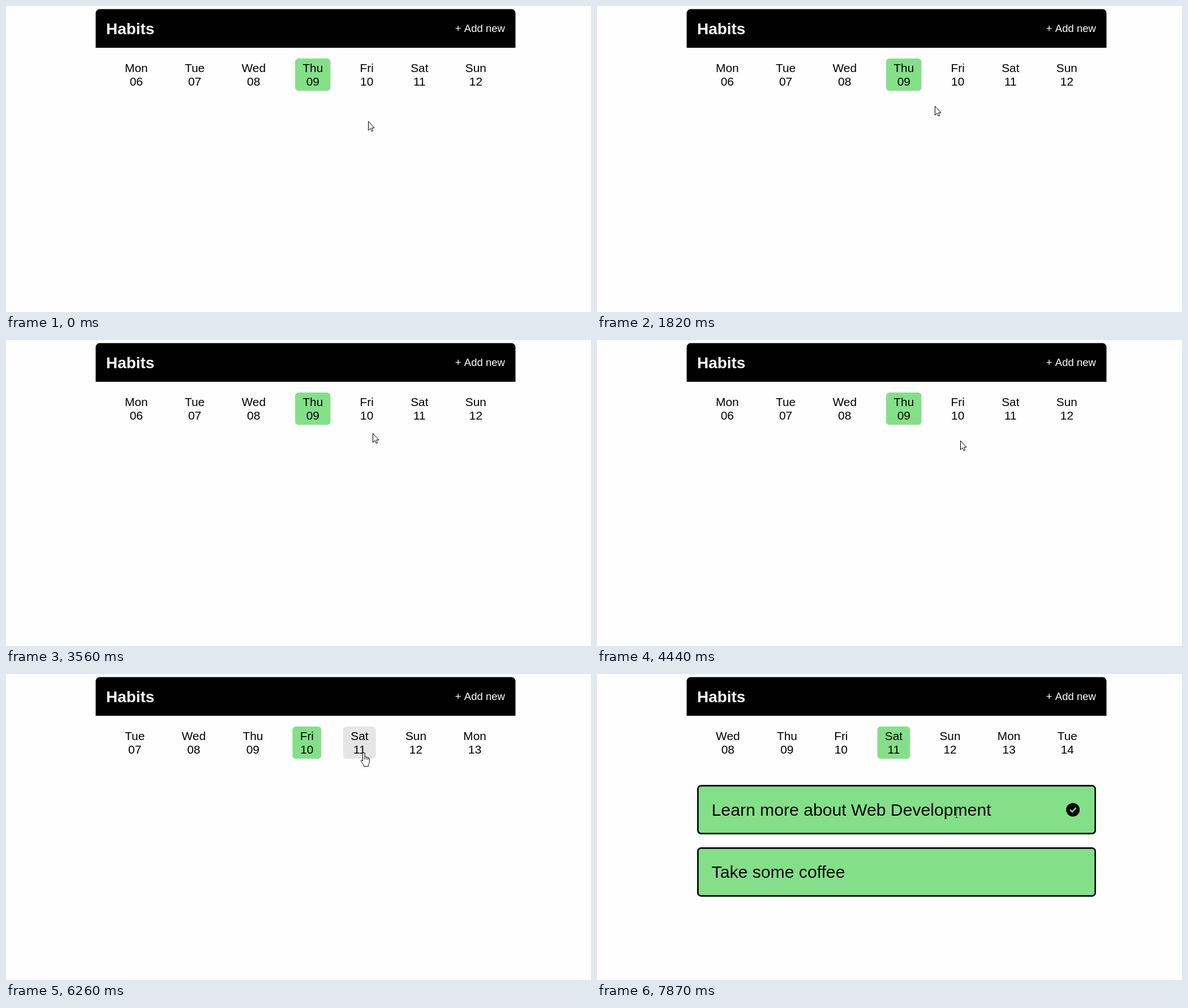
Recreate the animation shown at these times as an HTML page with a canvas. Size 1034x542 px, loop 8000 ms.

```html
<!DOCTYPE html>
<html lang="en">
<head>
<meta charset="utf-8">
<title>Habits</title>
<style>
  html, body { margin: 0; width: 100%; height: 100%; overflow: hidden; background: #fefefe; }
  canvas { display: block; }
</style>
</head>
<body>
<canvas id="stage" width="1034" height="542"></canvas>
<script>
const ctx = document.getElementById('stage').getContext('2d');
const LOOP = 8000;
const GREEN = '#84e088';
const FONT = '"Liberation Sans", Arial, sans-serif';
const REM = 18.56;
const DAY_SIZE = REM * 1.125;
const HABIT_SIZE = REM * 1.625;

const NAMES = ['Mon', 'Tue', 'Wed', 'Thu', 'Fri', 'Sat', 'Sun'];
const FIRST_DATE = 6;
const CLICKS = [5100, 7270]; // each click moves the week on by one day
const ROW = { left: 196.8, right: 862.2, top: 93, height: 57.3, pad: 13.25 };

// Pointer moves: start, end, target x, target y. It rests in between.
const HOME = { x: 640, y: 204 };
const MOVES = [
  [130, 670, 573, 208],
  [740, 910, 556, 207],
  [1000, 1820, 597, 177],
  [1890, 2410, 640, 172],
  [3220, 3560, 648, 165],
  [3630, 4020, 642, 178],
  [4840, 5240, 631, 127],
  [6060, 6730, 634, 186],
  [7269, 7270, 631, 130],
  [7600, 7870, 635, 247]
];

function pointerAt(t) {
  let { x, y } = HOME;
  for (const [start, end, toX, toY] of MOVES) {
    const k = Math.min(1, Math.max(0, (t - start) / (end - start)));
    const ease = k * k * (3 - 2 * k);
    x += (toX - x) * ease;
    y += (toY - y) * ease;
  }
  return { x: Math.round(x), y: Math.round(y) };
}

function text(str, x, y, size, { color = '#000', align = 'left', weight = '' } = {}) {
  ctx.font = `${weight} ${size}px ${FONT}`;
  ctx.textAlign = align;
  ctx.fillStyle = color;
  ctx.fillText(str, x, y);
}

function box(x, y, w, h, radius, color) {
  ctx.fillStyle = color;
  ctx.beginPath();
  ctx.roundRect(x, y, w, h, radius);
  ctx.fill();
}

function drawHeader() {
  box(158.5, 5.6, 742, 68.4, [7, 7, 0, 0], '#000');
  text('Habits', 177.1, 50, REM * 1.5, { color: '#fff', weight: 'bold' });
  text('+ Add new', 882, 46, REM, { color: '#fff', align: 'right' });
}

// Seven cells spread evenly across the row.
function layoutWeek(shift) {
  ctx.font = `${DAY_SIZE}px ${FONT}`;
  const days = NAMES.map((_, i) => {
    const name = NAMES[(i + shift) % 7];
    const date = String(FIRST_DATE + shift + i).padStart(2, '0');
    return { name, date, w: ctx.measureText(name).width + ROW.pad * 2 };
  });
  const used = days.reduce((sum, d) => sum + d.w, 0);
  const gap = (ROW.right - ROW.left - used) / 6;
  let x = ROW.left;
  for (const d of days) {
    d.x = x;
    x += d.w + gap;
  }
  return days;
}

function drawWeek(shift, pointer) {
  const inRow = pointer.y >= ROW.top && pointer.y < ROW.top + ROW.height;
  let hovering = false;
  layoutWeek(shift).forEach(({ name, date, x, w }, i) => {
    const over = inRow && pointer.x >= x && pointer.x < x + w;
    hovering ||= over;
    if (i === 3 || over) box(x, ROW.top, w, ROW.height, 6, i === 3 ? GREEN : '#e5e5e5');
    text(name, x + w / 2, 117, DAY_SIZE, { align: 'center' });
    text(date, x + w / 2, 141, DAY_SIZE, { align: 'center' });
  });
  return hovering;
}

function drawHabit(label, y) {
  box(177, y, 705, 87.4, 7, '#000');
  box(179.7, y + 2.7, 699.6, 82, 4.5, GREEN);
  text(label, 202.6, Math.round(y + 54), HABIT_SIZE);
}

function drawCheck(x, y) {
  ctx.fillStyle = '#000';
  ctx.beginPath();
  ctx.arc(x, y, 12, 0, Math.PI * 2);
  ctx.fill();
  ctx.strokeStyle = GREEN;
  ctx.lineWidth = 2.6;
  ctx.lineCap = ctx.lineJoin = 'round';
  ctx.stroke(new Path2D(`M${x - 4.6} ${y + 0.4}l3.2 3.2l6.2 -6.4`));
}

const ARROW = new Path2D('M.5 .5V16.3L4.1 12.9L6.5 18.1L8.8 17.1L6.5 12H11Z');
const HAND = new Path2D(
  'M-1.5 14V1.5Q-1.5 -.5 .3 -.5Q2 -.5 2 1.5V7Q3.5 5 5 7.5Q6.5 5.8 7.8 8.5' +
  'Q10.3 7.5 10.3 10V16Q10.3 18.5 8.5 20.5V23.5H.5V21.5L-4.5 14.5Q-5 10.5 -1.5 14Z' +
  'M2 7V11.5M5 7.5V11.5M7.8 8.5V12');
const BEAM = new Path2D('M-2.5 -7.5H3.5M.5 -7.5V7.5M-2.5 7.5H3.5');

function drawPointer({ x, y }, kind) {
  ctx.save();
  ctx.translate(x, y);
  ctx.lineWidth = 1;
  ctx.lineCap = 'butt';
  ctx.lineJoin = 'miter';
  ctx.fillStyle = '#fff';
  ctx.strokeStyle = kind === 'beam' ? '#3d5540' : '#000';
  const shape = { arrow: ARROW, hand: HAND, beam: BEAM }[kind];
  if (kind !== 'beam') ctx.fill(shape);
  ctx.stroke(shape);
  ctx.restore();
}

function draw(t) {
  const pointer = pointerAt(t);
  const shift = CLICKS.filter(c => c <= t).length;
  const hasHabits = shift === CLICKS.length;
  ctx.fillStyle = '#fefefe';
  ctx.fillRect(0, 0, 1034, 542);
  drawHeader();
  const hovering = drawWeek(shift, pointer);
  if (hasHabits) {
    drawHabit('Learn more about Web Development', 196.6);
    drawHabit('Take some coffee', 307);
    drawCheck(841.2, 240.5);
  }
  const onText = hasHabits && pointer.y > 222;
  drawPointer(pointer, hovering ? 'hand' : onText ? 'beam' : 'arrow');
}

const start = performance.now();
function tick() {
  draw((performance.now() - start) % LOOP);
  requestAnimationFrame(tick);
}
tick();
</script>
</body>
</html>
```
